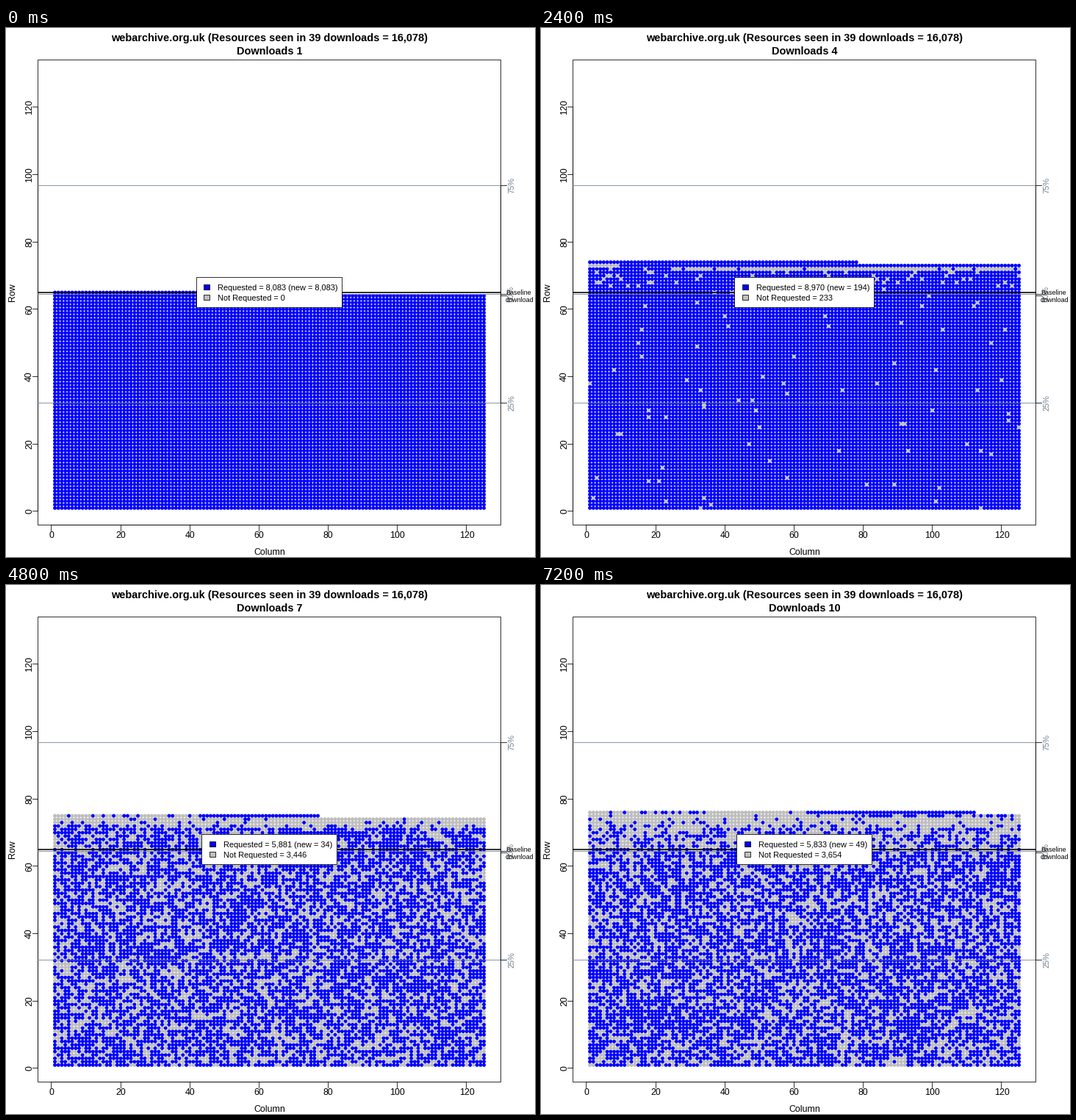
A matplotlib script that plays this animation: 720 px wide and 720 px high, repeating every 8 s.

```python
import math

import matplotlib.pyplot as plt
import numpy as np
from matplotlib.animation import FuncAnimation
from matplotlib.patches import Rectangle

plt.rcParams["font.family"] = "Liberation Sans"

SIZE = 720
COLS = 125
BLUE, GRAY, SLATE = "#0000ff", "#bebebe", "#708090"
LEFT, TOP, RIGHT, BOTTOM = 43.2, 43.2, 673.9, 676.8
THIN = 0.8

# Resources first seen in each download, and known ones it did not request.
NEW = [8083, 816, 110, 194, 33, 57, 34, 83, 28, 49]
MISSING = [0, 197, 3400, 233, 3494, 722, 3446, 3505, 3448, 3654]
# Share missed of the resources that came with downloads 2, 3, 4 ...;
# the first download's resources take up the remainder.
MISS_RATES = [
    [], [], [0.42], [0.07, 0.93], [0.4, 0.7, 0.9],
    [0.1, 0.5, 0.25, 0.92],
    [0.3, 0.75, 0.88, 0.97, 0.8],
    [0.38, 0.75, 0.88, 0.97, 0.88, 0.95],
    [0.4, 0.75, 0.9, 0.97, 0.9, 0.97, 0.83],
    [0.55, 0.8, 0.86, 0.97, 0.95, 0.95, 0.5, 0.97],
]
SEEN = np.cumsum(NEW)


def px(col):
    return LEFT + (col + 3.96) * (RIGHT - LEFT) / 133.92


def py(row):
    return BOTTOM - (row + 4.12) * (BOTTOM - TOP) / 138.24


def mid(v):
    """Centre of the pixel that holds v."""
    return math.floor(v) + 0.5


def missed(k):
    """Indices of known resources that download k did not request."""
    rng = np.random.default_rng(40 + k)
    counts = [round(r * n) for r, n in zip(MISS_RATES[k], NEW[1:])]
    counts.insert(0, MISSING[k] - sum(counts))
    starts = SEEN - NEW
    parts = [start + rng.choice(n, c, replace=False)
             for start, n, c in zip(starts, NEW, counts)]
    return np.concatenate(parts)


fig = plt.figure(figsize=(SIZE / 72, SIZE / 72), dpi=72, facecolor="white")
ax = fig.add_axes([0, 0, 1, 1])
ax.set_xlim(0, SIZE)
ax.set_ylim(SIZE, 0)
ax.axis("off")


def line(x0, y0, x1, y1, color="black"):
    ax.plot([mid(x0), mid(x1)], [mid(y0), mid(y1)], color=color, lw=THIN,
            zorder=3, snap=False, solid_capstyle="projecting")


def label(x, y, text, size, ha="center", z=4, **style):
    return ax.text(x, y, text, size=size, ha=ha, va="baseline", zorder=z, **style)


def side_label(x, y, text, size, color="black"):
    """Text read upwards, with its baseline at x and centred on y."""
    label(x, y, text, size, color=color, rotation=90, rotation_mode="anchor")


def box(x0, y0, x1, y1, face, z):
    patch = Rectangle((mid(x0), mid(y0)), mid(x1) - mid(x0), mid(y1) - mid(y0),
                      fc=face, ec="black", lw=THIN, zorder=z, snap=False)
    return ax.add_patch(patch)


# Frame and axes
box(LEFT, TOP, RIGHT, BOTTOM, "none", 3)
line(px(0), BOTTOM, px(120), BOTTOM)
line(LEFT, py(0), LEFT, py(120))
for v in range(0, 121, 20):
    line(px(v), BOTTOM, px(v), BOTTOM + 7.2)
    label(px(v), 694, str(v), 12.4)
    line(LEFT - 7.2, py(v), LEFT, py(v))
    side_label(35, py(v), str(v), 12.4)
label(358.5, 717, "Column", 12.4)
side_label(12, 360, "Row", 12.4)

# Quarter marks and the first download's level
line(RIGHT, py(96.75), RIGHT, py(32.25))
for pct in (25, 50, 75):
    y = py(129 * pct / 100)
    line(LEFT, y, RIGHT, y, SLATE)
    line(RIGHT, y, RIGHT + 7.2, y)
    side_label(691, y, f"{pct}%", 11, SLATE)
ax.plot([LEFT, RIGHT], [py(65), py(65)], color="black", lw=1.6, zorder=3,
        snap=False, solid_capstyle="butt")
line(RIGHT, py(64), RIGHT + 7.2, py(64))
label(680, 363, "Baseline", 9, "left")
label(680, 373, "download", 9, "left")

label(359, 18, "webarchive.org.uk (Resources seen in 39 downloads = 16,078)",
      14.5, weight="bold")
title = label(358.5, 36, "", 14.5, weight="bold")

index = np.arange(SEEN[-1])
spots = np.column_stack([px(index % COLS + 1), py(index // COLS + 1)])
dots = ax.scatter(spots[:, 0], spots[:, 1], s=25, linewidths=0, zorder=2)
palette = np.array([[0, 0, 1, 1], [190 / 255] * 3 + [1]])

# Legend
panel = box(259, 339, 457, 380, "white", 5)
swatches = [box(0, y, 8, y + 7, c, 6) for y, c in ((349, BLUE), (363, GRAY))]
entries = [label(0, y, "", 11, "left", z=6) for y in (357, 371)]


def update(k):
    total = SEEN[k]
    state = np.zeros(total, dtype=int)
    state[missed(k)] = 1
    dots.set_offsets(spots[:total])
    dots.set_facecolors(palette[state])

    title.set_text(f"Downloads {k + 1}")
    new = f"{NEW[k]:,}"
    entries[0].set_text(f"Requested = {total - MISSING[k]:,} (new = {new})")
    entries[1].set_text(f"Not Requested = {MISSING[k]:,}")

    # The panel widens with the digits of the count
    width = 171 + 6.1 * len(new) - 3.2 * new.count(",")
    left = 358.5 - width / 2
    panel.set_x(mid(left))
    panel.set_width(mid(left + width) - mid(left))
    for swatch in swatches:
        swatch.set_x(mid(left + 10.6))
    for entry in entries:
        entry.set_x(left + 28.7)
    return dots, title, panel, *swatches, *entries


anim = FuncAnimation(fig, update, frames=10, interval=800, repeat=True, blit=False)
plt.show()
```
